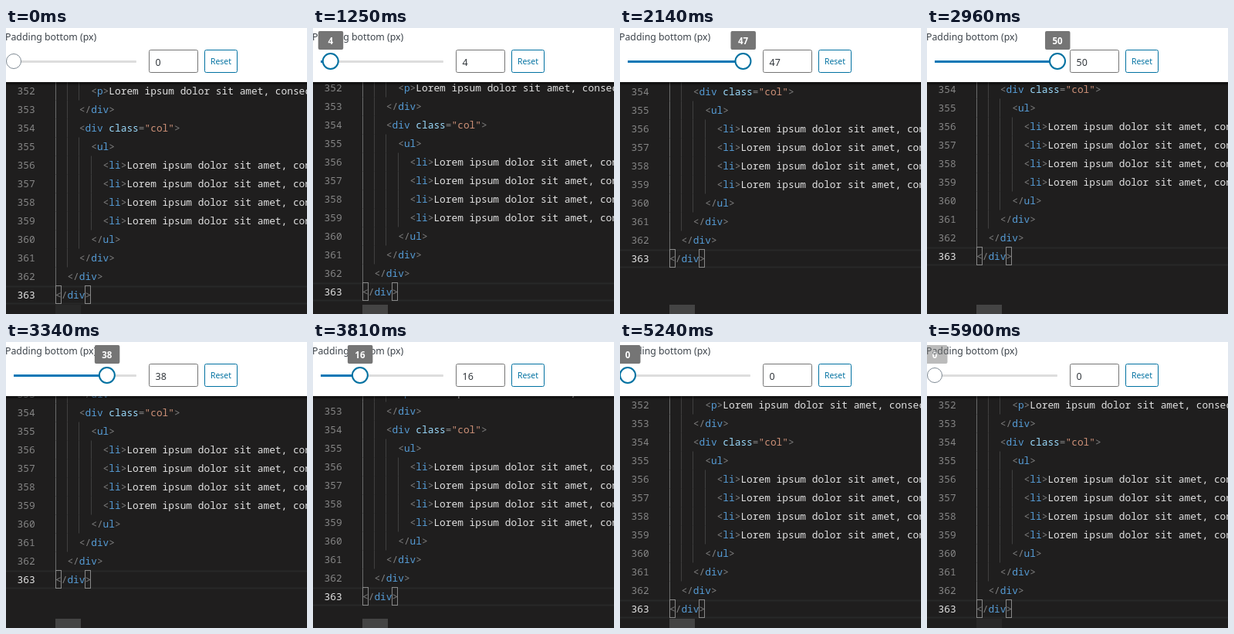
Write an HTML page that moves like this. It is 390 px wide and 370 px high and loops after 5.93 s.

```html
<!DOCTYPE html>
<html lang="en">
<head>
<meta charset="utf-8">
<title>Padding slider</title>
<style>
  html, body { margin: 0; width: 100%; height: 100%; overflow: hidden; background: #fff; }
  svg { display: block; }
  text { white-space: pre; font-family: "Noto Sans", sans-serif; }
  #code text { font: 12.83px "Noto Sans Mono", monospace; }
  .label { font-size: 12.3px; fill: #3c434a; }
  .value { font-size: 12.5px; fill: #32373c; }
  .reset { font-size: 10.4px; fill: #0071a1; }
  .bubble { font-size: 11.5px; font-weight: 600; fill: #fff; text-anchor: middle; }
</style>
</head>
<body>
<svg width="390" height="370" viewBox="0 0 390 370">
  <defs>
    <linearGradient id="shade" x2="0" y2="1">
      <stop stop-color="#000" stop-opacity=".6"/>
      <stop offset="1" stop-color="#000" stop-opacity="0"/>
    </linearGradient>
  </defs>
  <rect y="70" width="390" height="300" fill="#1f1e1e"/>
  <g id="code"></g>
  <rect id="scrollbar" x="64" y="358" width="33" height="12" fill="#444"/>
  <rect y="70" width="390" height="5" fill="url(#shade)"/>

  <rect width="390" height="70" fill="#fff"/>
  <text class="label" x="-1" y="16">Padding bottom (px)</text>
  <rect x="10" y="42" width="159" height="3" rx="1" fill="#ddd"/>
  <rect id="fill" x="10" y="42" height="3" fill="#0a77b5"/>
  <circle id="thumb" cy="43" fill="#fff"/>
  <rect x="185.5" y="28.5" width="63" height="29" rx="2" fill="#fff" stroke="#757575"/>
  <text class="value" id="value" x="193.5" y="49"></text>
  <rect x="257.5" y="28.5" width="42" height="29" rx="2" fill="#fff" stroke="#0071a1"/>
  <text class="reset" x="265" y="47">Reset</text>
  <g id="tooltip">
    <rect x="-16" y="4" width="32.5" height="24" rx="2" fill="#757575"/>
    <text class="bubble" id="bubble" y="20.5"></text>
  </g>
</svg>
<script>
const LOOP = 5930, CHAR = 7.7, LINE = 24, LEFT = 64, LAST = 363, BASE = 345.5;
const $ = id => document.getElementById(id);
const COLORS = { punct: '#808080', tag: '#569cd6', attr: '#9cdcfe', str: '#ce9178', text: '#e2e2e2' };

const lorem = 'Lorem ipsum dolor sit amet, consectetur';
const item = [4, `<li>${lorem}`];
const lines = [
  [3, `<p>${lorem}`], [2, '</div>'], [2, '<div class="col">'], [3, '<ul>'],
  item, item, item, item,
  [3, '</ul>'], [2, '</div>'], [1, '</div>'], [0, '</div>']
];

const span = (kind, s) => s &&
  `<tspan fill="${COLORS[kind]}">${s.replace(/</g, '&lt;').replace(/>/g, '&gt;')}</tspan>`;

function highlight(source) {
  const [, open, tag, attr = '', eq = '', str = '', close, rest] =
    source.match(/^(<\/?)(\w+)(?:( \w+)(=)("\w+"))?(>)(.*)$/);
  return span('punct', open) + span('tag', tag) + span('attr', attr) + span('punct', eq) +
    span('str', str) + span('punct', close) + span('text', rest);
}

function buildCode() {
  const top = BASE - LINE / 2;
  let out = `<path d="M0 ${top + 1}H390M0 ${top + LINE - 1}H390" stroke="#282828" stroke-width="2"/>`;
  lines.forEach(([indent, source], i) => {
    const number = LAST - lines.length + 1 + i;
    const mid = BASE - (LAST - number) * LINE;
    const y = mid + 4.5;
    for (let g = 0; g < indent; g++) {
      out += `<rect x="${Math.floor(LEFT + g * 2 * CHAR)}" y="${mid - LINE / 2}" width="1" height="${LINE}" fill="${g ? '#404040' : '#6c6c6c'}"/>`;
    }
    out += `<text x="14.6" y="${y}" fill="${number === LAST ? '#e4e4e4' : '#858585'}">${number}</text>`;
    out += `<text x="${LEFT + indent * 2 * CHAR}" y="${y}">${highlight(source)}</text>`;
  });
  for (const x of [64.5, 102.5]) {
    out += `<rect x="${x}" y="${top}" width="7" height="${LINE - 1}" fill="none" stroke="#888"/>`;
  }
  $('code').innerHTML = out;
}

// Linear interpolation through [time, value] pairs
function track(keys, t) {
  const i = keys.findIndex(key => key[0] > t);
  if (i < 0) return keys[keys.length - 1][1];
  if (i === 0) return keys[0][1];
  const [t0, v0] = keys[i - 1], [t1, v1] = keys[i];
  return v0 + (v1 - v0) * (t - t0) / (t1 - t0);
}

const padding = [[1080, 0], [1250, 4], [1760, 28], [2140, 46.5], [2220, 50],
  [3040, 50], [3140, 47], [3810, 16], [4160, 5], [4500, 3], [4680, 0]];
const bubbleOpacity = [[930, 0], [1030, 1], [5840, 1], [5960, 0]];
const barOpacity = [[30, .25], [60, 0], [940, 0], [1040, 1], [5240, 1], [5850, .28], [5930, .25]];

function draw(t) {
  const value = Math.round(track(padding, t));
  const x = 10 + value * 3.18;
  const focused = t >= 940 && t < 5850;

  $('code').setAttribute('transform', `translate(0 ${-value})`);
  $('scrollbar').setAttribute('opacity', track(barOpacity, t));
  $('fill').setAttribute('width', x - 10);
  $('thumb').setAttribute('cx', x);
  $('thumb').setAttribute('r', focused ? 10 : 9.5);
  $('thumb').setAttribute('stroke', focused ? '#0071a1' : '#7e8993');
  $('thumb').setAttribute('stroke-width', focused ? 2 : 1);
  $('value').textContent = $('bubble').textContent = value;
  $('tooltip').setAttribute('transform', `translate(${x} 0)`);
  $('tooltip').setAttribute('opacity', t < 930 ? 0 : track(bubbleOpacity, t));
}

buildCode();
const start = performance.now();
function frame() {
  draw((performance.now() - start) % LOOP);
  requestAnimationFrame(frame);
}
frame();
</script>
</body>
</html>
```
